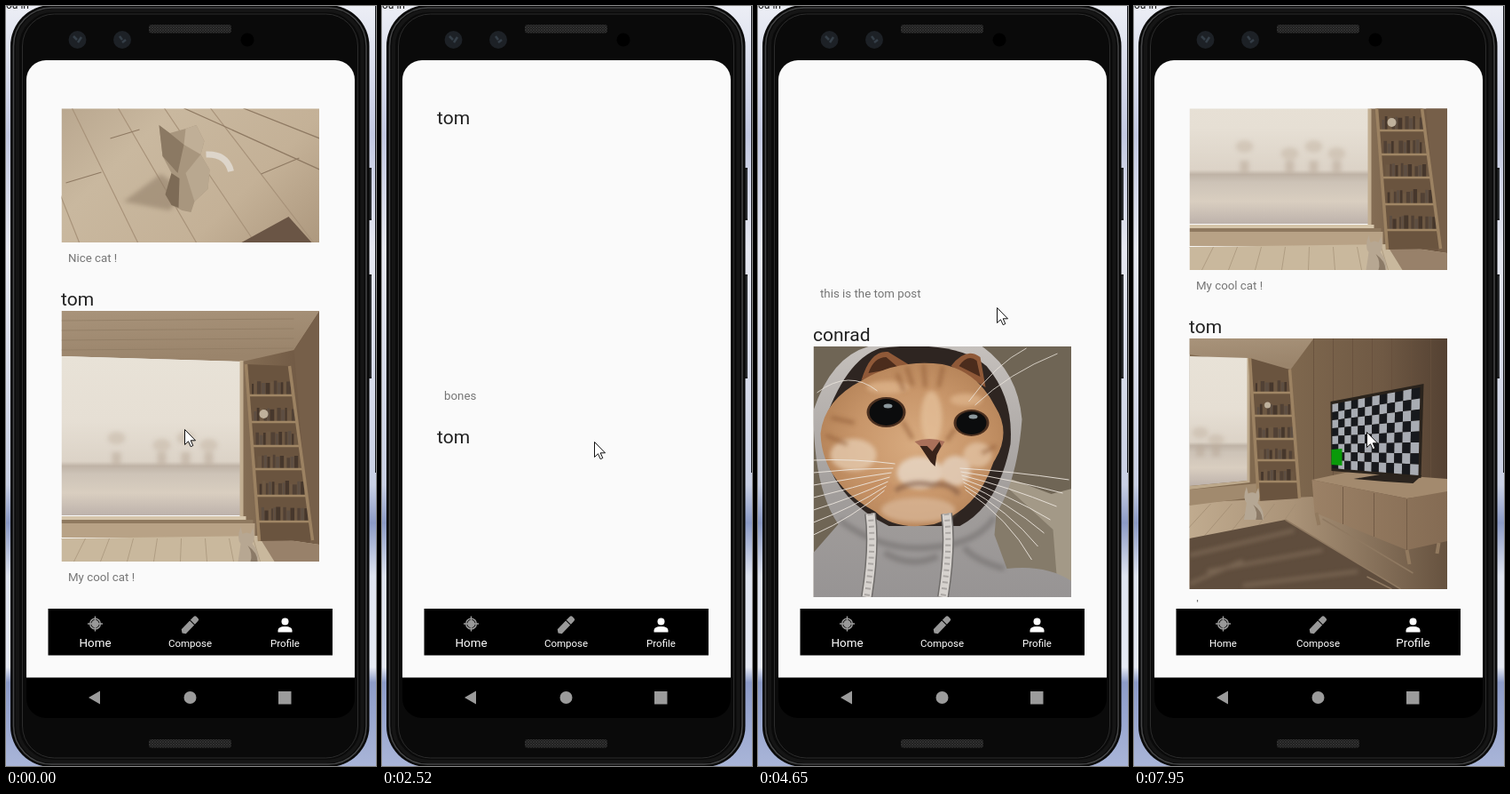
An HTML page for the animation above (8 s loop, 417x855 px).

```html
<!DOCTYPE html>
<html lang="en">
<head>
<meta charset="utf-8">
<title>Photo feed on a phone</title>
<style>
html, body { margin: 0; width: 100%; height: 100%; overflow: hidden; background: #dfe3ee }
svg.stage { display: block; width: 100vw; height: 100vh }
text { font-family: Roboto, sans-serif }
.title { font-size: 21px; fill: #212121 }
.note { font-size: 13.3px; fill: #757575 }
.tab { font-size: 11.5px; fill: #fff; text-anchor: middle }
.tab.on { font-size: 13.4px }
</style>
</head>
<body>
<svg class="stage" viewBox="0 0 417 855">
  <defs>
    <linearGradient id="wall" x2="0" y2="1">
      <stop offset="0" stop-color="#eceef5"/><stop offset=".17" stop-color="#c3c9e2"/>
      <stop offset=".32" stop-color="#e6e8f1"/><stop offset=".63" stop-color="#c9d0e4"/>
      <stop offset=".68" stop-color="#8c9bc6"/><stop offset=".75" stop-color="#dfe4f0"/>
      <stop offset=".87" stop-color="#e6eaf4"/><stop offset=".89" stop-color="#8d9cc9"/>
      <stop offset="1" stop-color="#a9b5d8"/>
    </linearGradient>
    <linearGradient id="floor" x2="1" y2="1">
      <stop offset="0" stop-color="#a8957e"/><stop offset=".45" stop-color="#c9b89f"/>
      <stop offset=".75" stop-color="#c4b197"/><stop offset="1" stop-color="#ad987e"/>
    </linearGradient>
    <linearGradient id="view" x2="0" y2="1">
      <stop offset="0" stop-color="#e8e2d7"/><stop offset=".4" stop-color="#e6dfd4"/>
      <stop offset=".66" stop-color="#dcd3c7"/><stop offset=".69" stop-color="#bfb3a6"/>
      <stop offset=".74" stop-color="#cdc3b7"/><stop offset=".86" stop-color="#d9cec0"/>
      <stop offset="1" stop-color="#bdb2ab"/>
    </linearGradient>
    <linearGradient id="ceil" x2=".3" y2="1">
      <stop offset="0" stop-color="#a8937a"/><stop offset="1" stop-color="#9a846b"/>
    </linearGradient>
    <linearGradient id="side">
      <stop offset="0" stop-color="#846d54"/><stop offset="1" stop-color="#6a533f"/>
    </linearGradient>
    <linearGradient id="room">
      <stop offset=".35" stop-color="#80694f"/><stop offset=".75" stop-color="#6f5944"/>
      <stop offset="1" stop-color="#544132"/>
    </linearGradient>
    <linearGradient id="boards">
      <stop offset="0" stop-color="#c0ab8f"/><stop offset=".4" stop-color="#aa9378"/>
      <stop offset="1" stop-color="#66523f"/>
    </linearGradient>
    <linearGradient id="drawers">
      <stop offset="0" stop-color="#9b8166"/><stop offset="1" stop-color="#846b53"/>
    </linearGradient>
    <radialGradient id="fur" cx=".52" cy=".5" r=".55">
      <stop offset="0" stop-color="#d8ab80"/><stop offset=".6" stop-color="#c8966a"/>
      <stop offset="1" stop-color="#b58358"/>
    </radialGradient>
    <linearGradient id="hood" x2="0" y2="1">
      <stop offset="0" stop-color="#c5c0bc"/><stop offset=".6" stop-color="#a19d9b"/>
      <stop offset="1" stop-color="#979494"/>
    </linearGradient>
    <pattern id="mesh" width="3" height="3" patternUnits="userSpaceOnUse">
      <path d="M0 0H3V3H0Z" fill="#1c1c1c"/><path d="M0 0L3 3M3 0L0 3" stroke="#3a3a3a" stroke-width=".7"/>
    </pattern>
    <filter id="soft"><feGaussianBlur stdDeviation="2.5"/></filter>
    <clipPath id="list"><path d="M23 115.500H393V670.500H23Z"/></clipPath>
  </defs>

  <path d="M0 0H417V855H0Z" fill="url(#wall)"/>
  <path d="M416.500 0V525" stroke="#15171c"/>
  <text x="0" y="3" font-size="12" fill="#111">ou in</text>
  <path d="M406 182h6v59h-6zM406 302h6v117h-6z" fill="#17181a"/>
  <path d="M411 184v55M411 304v113" stroke="#44474a"/>
  <g fill="none">
    <rect x="5" y="-1" width="404.500" height="857" rx="46" fill="#0a0a0a"/>
    <rect x="8.500" y="2" width="397.500" height="851" rx="43" stroke="#454647" stroke-width="1.500"/>
    <rect x="13" y="5" width="388.500" height="845" rx="40" stroke="#151515" stroke-width="4"/>
    <rect x="18.500" y="9" width="378" height="837" rx="36" stroke="#2c2c2c"/>
  </g>
  <rect x="161" y="21" width="93" height="9.500" rx="3" fill="url(#mesh)"/>
  <rect x="161" y="825" width="93" height="9.500" rx="3" fill="url(#mesh)"/>
  <g fill="#1d2126">
    <circle cx="80.500" cy="38" r="10"/><circle cx="131" cy="38" r="10"/>
    <circle cx="272" cy="38" r="7.500" fill="#000"/>
    <path d="M76 34l4 4M81 41l4-6M128 34l3 4M131 41l4-3" stroke="#353f48" stroke-width="2.500"/>
  </g>
  <path d="M23 756V83A22 22 0 0 1 45 61H371A22 22 0 0 1 393 83V756Z" fill="#fafafa"/>
  <path d="M23 755.500H393V779A22 22 0 0 1 371 801H45A22 22 0 0 1 23 779Z"/>
  <path d="M93 778L106 770.500V785.500ZM307 771h14.500v14.500h-14.500z" fill="#9b9b9b"/>
  <circle cx="207.500" cy="778" r="7" fill="#9b9b9b"/>

  <g clip-path="url(#list)"><g id="feed"></g></g>

  <path d="M47.500 678H368V730.500H47.500Z"/>
  <g fill="none" stroke="#999" stroke-width="1.500">
    <circle cx="100.500" cy="695" r="5.800"/><circle cx="100.500" cy="695" r="3.500" fill="#999"/>
    <path d="M100.500 686.500v17M92 695h17"/>
  </g>
  <path d="M0 0L2.500-3.500H16V3.500H2.500ZM17-3.500h5q2.500 0 2.500 2v3q0 2-2.500 2h-5z" fill="#999" transform="translate(198.500 705.500) rotate(-46)"/>
  <g fill="#fff"><circle cx="314.500" cy="692.500" r="4"/><path d="M306.500 704.500v-2q0-4.500 8-4.500t8 4.500v2z"/></g>
  <text class="tab" id="home" x="100.500" y="721">Home</text>
  <text class="tab" x="207.500" y="721">Compose</text>
  <text class="tab" id="profile" x="314.500" y="721">Profile</text>
  <path id="cursor" d="M0 0V17L4 13.300L6.700 19.200L9.300 18L6.700 12.300H12Z" fill="#fff" stroke="#111" stroke-linejoin="round"/>
</svg>

<script>
const $ = id => document.getElementById(id);
const mix = (a, b, k) => a + (b - a) * k;
const rand = n => { const v = Math.sin(n * 127.1) * 43758.5; return v - Math.floor(v); };

// Shape helpers returning SVG markup
const fill = (color, d) => `<path d="${d}" fill="${color}"/>`;
const line = (color, w, d) => `<path d="${d}" fill="none" stroke="${color}" stroke-width="${w}"/>`;
const oval = (color, x, y, rx, ry = rx) => `<ellipse cx="${x}" cy="${y}" rx="${rx}" ry="${ry}" fill="${color}"/>`;
const soft = (opacity, body) => `<g filter="url(#soft)" opacity="${opacity}">${body}</g>`;

// Leaning bookshelf between two rails [x0, y0, x1, y1]
function ladder(l, r, shelves, tall) {
  const at = (rail, y) => mix(rail[0], rail[2], (y - rail[1]) / (rail[3] - rail[1]));
  let out = fill('#6a543f', `M${l[0]} ${l[1]}L${r[0]} ${r[1]}L${r[2]} ${r[3]}L${l[2]} ${l[3]}Z`);
  shelves.forEach((y, i) => {
    const a = at(l, y), b = at(r, y);
    for (let x = a + 4, n = i * 31; x < b - 5; n++) {
      const w = 2 + rand(n) * 3, h = tall * (.7 + rand(n + 9) * .3);
      const c = ['#46372c', '#6d5843', '#514135', '#5d4e42'][n % 4];
      out += fill(c, `M${x} ${y}h${w}v${-h}h${-w}z`);
      x += w + .5;
    }
    out += line('#a08665', 2.5, `M${a} ${y}L${b} ${y}`);
  });
  for (const p of [l, r]) out += line('#9c8262', 3.5, `M${p[0]} ${p[1]}L${p[2]} ${p[3]}`);
  return out;
}

const sitting = (x, y, k, c) => `<g transform="translate(${x} ${y}) scale(${k})">` +
  fill(c, 'M-6-39L-4-31Q1-34 5-31L8-38Q11-25 7-20Q15-12 14 0H-9Q-7-12-6-20Q-11-26-6-39Z') +
  fill('#8b7a67', 'M2-18Q13-10 13 0H5Q8-9 2-18Z') + '</g>';

const trees = (xs, y, k) => soft(.5, xs.map((x, i) =>
  oval('#c3b4a3', x, y + i % 2 * 8, 10 * k, 7 * k) + fill('#b6a594', `M${x - 5 * k} ${y + 16 * k}h${10 * k}v${14 * k}h${-10 * k}z`)).join(''));

function figurine() {
  let out = fill('url(#floor)', 'M0 0H291V282H0Z');
  for (let i = 0; i < 5; i++) out += line('#a8937a', 1.2, `M${i * 52 - 40} 131L${i * 66 + 20} 282`);
  out += line('#8f7a63', 1.3, 'M138 131L185 152L291 200M225 205L268 187M205 131L291 165M5 215L45 203M55 165L88 155');
  out += soft(.6, fill('#93806a', 'M122 246L70 236L112 205L140 224Z'));
  out += line('#ddd5ca', 7, 'M163 183Q186 182 191 202');
  out += fill('#a8967e', 'M110 150L122 159L140 154L152 150L161 168L157 183L167 200L165 222L150 236L146 248L136 246L124 240L117 228L124 204L114 185Z');
  out += fill('#c0af97', 'M140 154L152 150L161 168L157 183L138 172Z') + fill('#8b7963', 'M110 150L122 159L138 172L131 204L114 185Z');
  out += fill('#b9a890', 'M140 204L157 183L167 200L165 222L150 236Z') + fill('#7d6b56', 'M124 204L133 210L132 243L124 240L117 228Z');
  return out + fill('#6a5545', 'M203 282L256 253L282 282Z');
}

function lounge() {
  let out = fill('url(#side)', 'M204 0H291V282H204Z') + fill('url(#ceil)', 'M0 0H291L262 44L204 57L0 51Z');
  for (let i = 1; i < 5; i++) out += line('#8f7a62', .7, `M0 ${i * 11}L262 ${i * 11 - 2}`);
  out += fill('#765f49', 'M291 0L262 44L281 270H291Z');
  out += fill('url(#view)', 'M0 51L204 57V230H0Z') + trees([62, 113, 140, 166], 143, 1);
  out += fill('#c2ae91', 'M201 56h4v178h-4z') + fill('#d5c5aa', 'M0 231H208V235H0Z');
  out += fill('#8f795f', 'M0 235H216V239H0Z') + fill('#b8a286', 'M0 239H218V255H0Z');
  out += fill('#c9b89d', 'M0 256L222 253L291 263V282H0Z');
  for (let i = 0; i < 9; i++) out += line('#a9967c', .8, `M${i * 27} 256L${i * 30 - 16} 282`);
  out += fill('#98816a', 'M222 253L291 263V282H240Z');
  out += ladder([208, 60, 223, 259], [257, 62, 283, 258], [95, 125, 152, 178, 208, 237], 17);
  return out + oval('#bfb19c', 228, 116, 5) + sitting(208, 282, 1, '#b7a792');
}

function screenRoom() {
  let out = fill('url(#room)', 'M0 0H291V282H0Z') + fill('url(#ceil)', 'M0 0H140L114 35L0 18Z');
  for (let i = 0; i < 7; i++) out += line('#66503d', .8, `M${140 + i * 22} 0V170`);
  out += fill('url(#boards)', 'M0 185L138 178L291 225V282H0Z') + fill('url(#view)', 'M0 20L66 22V160L0 166Z');
  out += trees([12, 30], 106, .9) + fill('#bda98c', 'M65 22h3v140L0 170V166L65 160Z') + fill('#a18a6e', 'M0 170L78 163V178L0 188Z');
  for (let i = 0; i < 6; i++) out += line('#a28d73', .8, `M${i * 24} 186L${i * 26 - 35} 222`);
  out += ladder([68, 22, 78, 183], [113, 35, 124, 180], [61, 87, 113, 137, 161], 14);
  out += oval('#bfb19c', 88, 75, 3.5);
  out += fill('#5f4d3d', 'M0 225L108 204L238 282H0Z');
  out += soft(.6, line('#8d7863', 4, 'M0 244L118 216M20 262L150 238M60 278L190 262M0 276L60 250'));
  out += line('#8f7961', 1.5, 'M108 204L238 282M150 203L252 264M200 268L228 282');
  out += fill('#a38a6e', 'M138 159L180 150L291 158V174L245 180Z') + fill('url(#drawers)', 'M138 159L245 180L291 172V228L245 238L141 196Z');
  out += line('#725b46', 1, 'M173 167V209M208 174V223M245 181V238');
  out += line('#927a5f', 4, 'M143 196L146 210M245 238L248 254M281 230L279 242');
  out += fill('#2b241e', 'M185 158L215 153L262 154L252 163L220 161Z') + fill('#2a231c', 'M159 71L264 51L261 157L160 149Z');
  const cols = 12, rows = 8;
  const spot = (c, r) => {
    const u = c / cols, k = u * (.82 + .18 * u);
    return mix(161, mix(260, 258, r / rows), k) + ' ' + mix(mix(74, 55, k), mix(146, 154, k), r / rows);
  };
  for (let c = 0; c < cols; c++) for (let r = 0; r < rows; r++)
    out += fill((c + r) % 2 ? '#17191d' : '#a8acb3', `M${spot(c, r)}L${spot(c + 1, r)}L${spot(c + 1, r + 1)}L${spot(c, r + 1)}Z`);
  return out + fill('#0a9a0a', 'M160 125L172 124V143L160 142Z') + sitting(70, 204, .95, '#b5a794');
}

function hoodie() {
  let out = fill('#6f6555', 'M0 0H291V282H0Z') + fill('#857b6a', 'M195 150L291 192V282H195Z') + fill('#a39987', 'M198 140L268 166L291 160V282H276L270 206Z');
  out += fill('url(#hood)', 'M0 72Q20 12 62 0H190Q230 28 235 82Q230 150 206 188L204 212L218 250Q262 245 291 264V282H0V232L28 200Q0 160 0 72Z');
  // Shadow inside the hood, then folds below the chin
  out += fill('#2e2521', 'M10 92Q35 15 75 2Q160-8 195 22Q226 58 222 110Q208 180 165 202H85Q10 165 10 92Z');
  out += soft(.55, line('#6f6c6b', 7, 'M30 196Q80 232 132 226Q185 222 204 192M80 232Q110 250 140 236M215 250Q180 240 170 226'));
  out += fill('#8f5938', 'M54 38Q64 4 84 6L110 22ZM155 22Q172 0 188 12L194 46Z') + fill('#4b2c1c', 'M62 30Q68 12 82 12L96 24ZM164 22Q174 8 184 16L188 34Z');
  out += fill('url(#fur)', 'M8 98Q12 60 55 38Q95 14 145 20Q185 28 205 68Q224 98 203 130Q185 184 136 200Q92 208 70 186Q10 154 8 98Z');
  out += soft(.75, oval('#e6cdb2', 45, 122, 26, 18) + oval('#e3c5a6', 185, 122, 16, 14) +
    oval('#e4c19b', 133, 80, 12, 30) + oval('#dfb68d', 84, 46, 24, 7) + oval('#dfb68d', 172, 60, 18, 7) +
    oval('#e9dccd', 120, 142, 26, 18) + oval('#e6d5c4', 160, 140, 17, 17) + oval('#d9b798', 118, 184, 42, 14));
  out += soft(.7, line('#935f3a', 4, 'M105 23L112 44M124 20L126 46M146 22L141 46M94 30L102 50M14 100L38 110M20 80L46 86M100 84L112 104M160 92L150 106M190 120L206 112') +
    line('#7b5440', 5, 'M92 162Q112 150 134 156Q152 152 164 166') + oval('#c58f63', 72, 160, 18, 12));
  for (const [x, y, r] of [[82, 74, 20], [178, 86, 18]])
    out += oval('#4a2f1f', x, y, r + 2, r - 3) + oval('#0b0c0d', x, y, r - 1, r - 5) + oval('#8b979c', x + 2, y - 7, 5, 2.5);
  out += fill('#a9705a', 'M114 107Q130 101 148 107L140 120L133 123Z') + fill('#38231a', 'M120 112L128 112L134 118L142 107L144 112L139 122L137 135L132 130Z');
  for (const x of [64, 150]) {
    const cord = `M${x} 188Q${x + 5} 225 ${x - 4} 282`;
    out += line('#6f6c6a', 13, cord) + line('#d6d2ce', 10, cord);
    out += `<path d="${cord}" fill="none" stroke="#aaa6a3" stroke-width="6" stroke-dasharray="2 5"/>`;
  }
  for (let i = 0; i < 7; i++)
    out += line('#eee7df', .9, `M${92 - i * 2} ${132 + i * 5}Q45 ${126 + i * 11} 0 ${128 + i * 14}M${165 + i} ${137 + i * 4}Q220 ${140 + i * 9} ${288 - i * 7} ${150 + i * 15}`);
  return out + line('#eee7df', .8, 'M175 62Q205 20 240 2M182 66Q220 30 275 8M72 50Q40 25 4 52');
}

const gap = 359;
const posts = [
  ['tom', 'Nice cat !', figurine], ['tom', 'My cool cat !', lounge], ['tom', 'home', screenRoom],
  ['tom', 'bones'], ['tom', 'this is the tom post'], ['conrad', '', hoodie]
];
$('feed').innerHTML = posts.map(([name, note, art], i) => {
  const y = 343 + (i - 1) * gap;
  return `<text class="title" x="62" y="${y - 6.5}">${name}</text>` +
    (art ? `<svg class="art" x="62.5" y="${y}" width="290.5" height="282">${art()}</svg>` : '') +
    `<text class="note" x="70" y="${y + 304}">${note}</text>`;
}).join('');
const arts = document.querySelectorAll('.art');

// The screen refreshes in bursts: first time, last time, steps
const ticks = [0];
for (const [a, b, n] of [[120, 1050, 8], [1170, 2100, 8], [2250, 3180, 8], [3330, 4260, 8], [4380, 5350, 8],
  [5470, 6100, 6], [6500, 6770, 3], [7070, 7220, 2], [7470, 7950, 5]])
  for (let i = 0; i < n; i++) ticks.push(mix(a, b, i / (n - 1)));

// time, scroll, cursor x, cursor y
const keys = [
  [0, 0, 201, 476], [1050, 288, 244, 459], [2516, 922, 239, 490], [3180, 1302, 258, 375],
  [3463, 1332, 263, 347], [4380, 1396, 268, 340], [4657, 1396, 269, 339], [5350, 1396, 345, 215],
  [6100, 1396, 315, 700], [6500, 1396, 315, 700], [6635, 192, 315, 700], [6770, 192, 315, 700],
  [7220, 192, 287, 528], [7950, 328, 262, 479]
];

function draw(now) {
  const t = now % 8000;
  const tick = ticks.filter(v => v <= t + 13).pop();
  const i = Math.min(keys.length - 2, keys.findLastIndex(k => k[0] <= tick));
  const a = keys[i], b = keys[i + 1], k = (tick - a[0]) / (b[0] - a[0]);
  const [scroll, x, y] = [1, 2, 3].map(n => Math.round(mix(a[n], b[n], k)));
  $('feed').setAttribute('transform', `translate(0 ${-scroll})`);
  $('cursor').setAttribute('transform', `translate(${x + .5} ${y + .5})`);
  const onProfile = tick >= 6500, loading = tick > 6500 && tick < 6770;
  $('home').classList.toggle('on', !onProfile);
  $('profile').classList.toggle('on', onProfile);
  arts.forEach(p => p.style.display = loading ? 'none' : '');
  requestAnimationFrame(draw);
}
requestAnimationFrame(draw);
</script>
</body>
</html>
```
